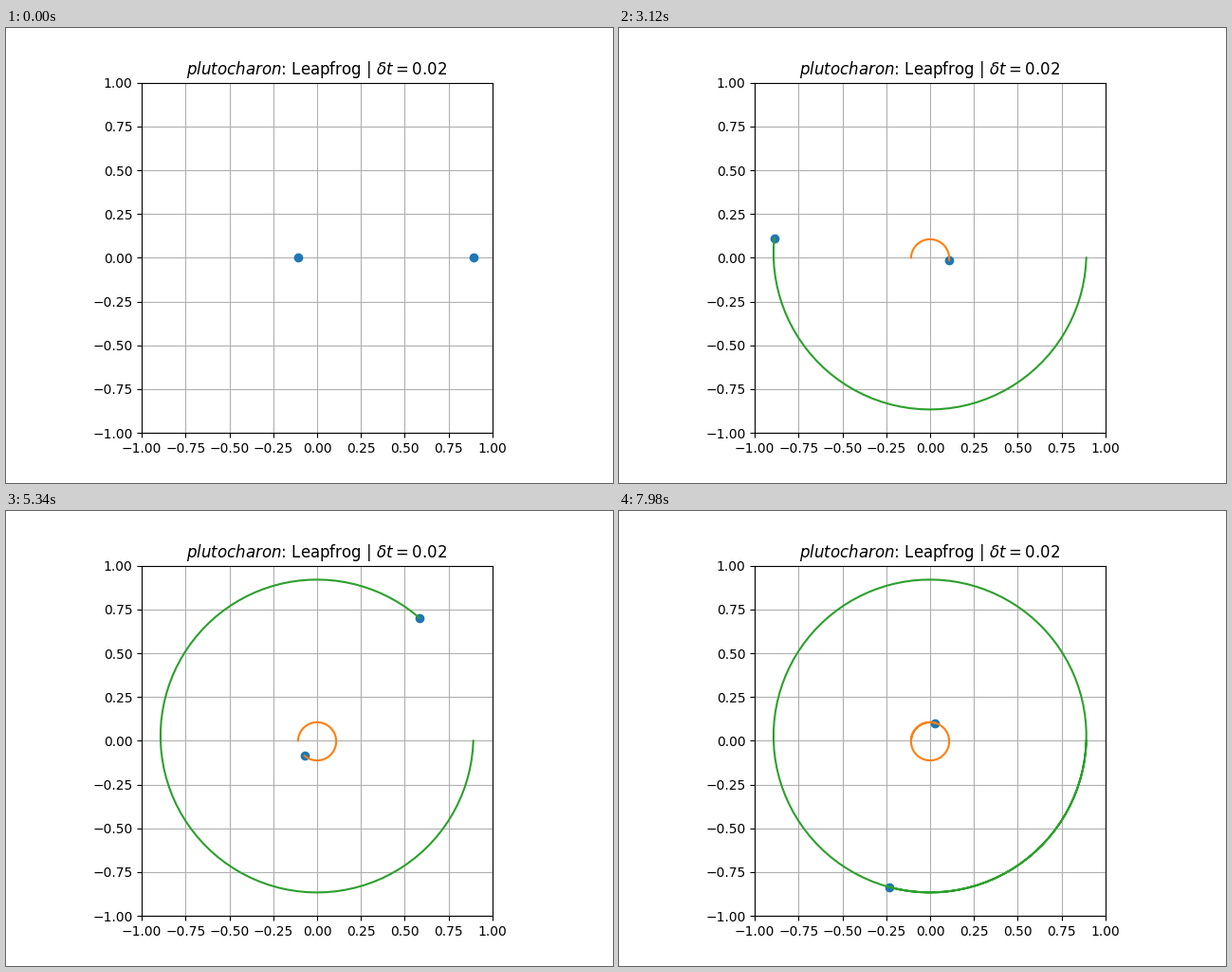
A matplotlib script that plays this animation: 640 by 480 pixels, repeating every 8 s.

```python
import numpy as np
import matplotlib.pyplot as plt
from matplotlib.animation import FuncAnimation

DT = 0.02
STEPS = 134
TICK = 20          # ms per animation frame
HOLD = 3           # animation frames per integration step
FRAMES = 400
MASS = np.array([8.2, 1.0])


def accelerations(pos):
    sep = pos[1] - pos[0]
    pull = sep / np.linalg.norm(sep) ** 3
    return np.array([MASS[1] * pull, -MASS[0] * pull])


def integrate():
    """Kick-drift orbit of two bodies around their barycentre."""
    total = MASS.sum()
    radii = np.array([-MASS[1], MASS[0]]) / total
    pos = np.column_stack([radii, np.zeros(2)])
    vel = np.column_stack([np.zeros(2), -np.sqrt(total) * radii])
    path = [pos]
    for _ in range(STEPS - 1):
        vel = vel + accelerations(pos) * DT
        pos = pos + vel * DT
        path.append(pos)
    return np.array(path)


path = integrate()

fig, ax = plt.subplots(figsize=(6.4, 4.8), dpi=100)
ax.set_aspect("equal")
ax.set_xlim(-1, 1)
ax.set_ylim(-1, 1)
ax.grid()
ax.set_title(r"$plutocharon$: Leapfrog | $\delta t = 0.02$")

dots, = ax.plot([], [], "o", color="C0")
trails = [ax.plot([], [], color=c)[0] for c in ("C1", "C2")]


def update(frame):
    step = min(frame // HOLD, STEPS - 1)
    dots.set_data(path[step, :, 0], path[step, :, 1])
    for body, trail in enumerate(trails):
        trail.set_data(path[:step + 1, body, 0], path[:step + 1, body, 1])
    return [dots, *trails]


anim = FuncAnimation(fig, update, frames=FRAMES, init_func=lambda: update(0),
                     interval=TICK, repeat=True, repeat_delay=0, blit=False)
plt.show()
```
